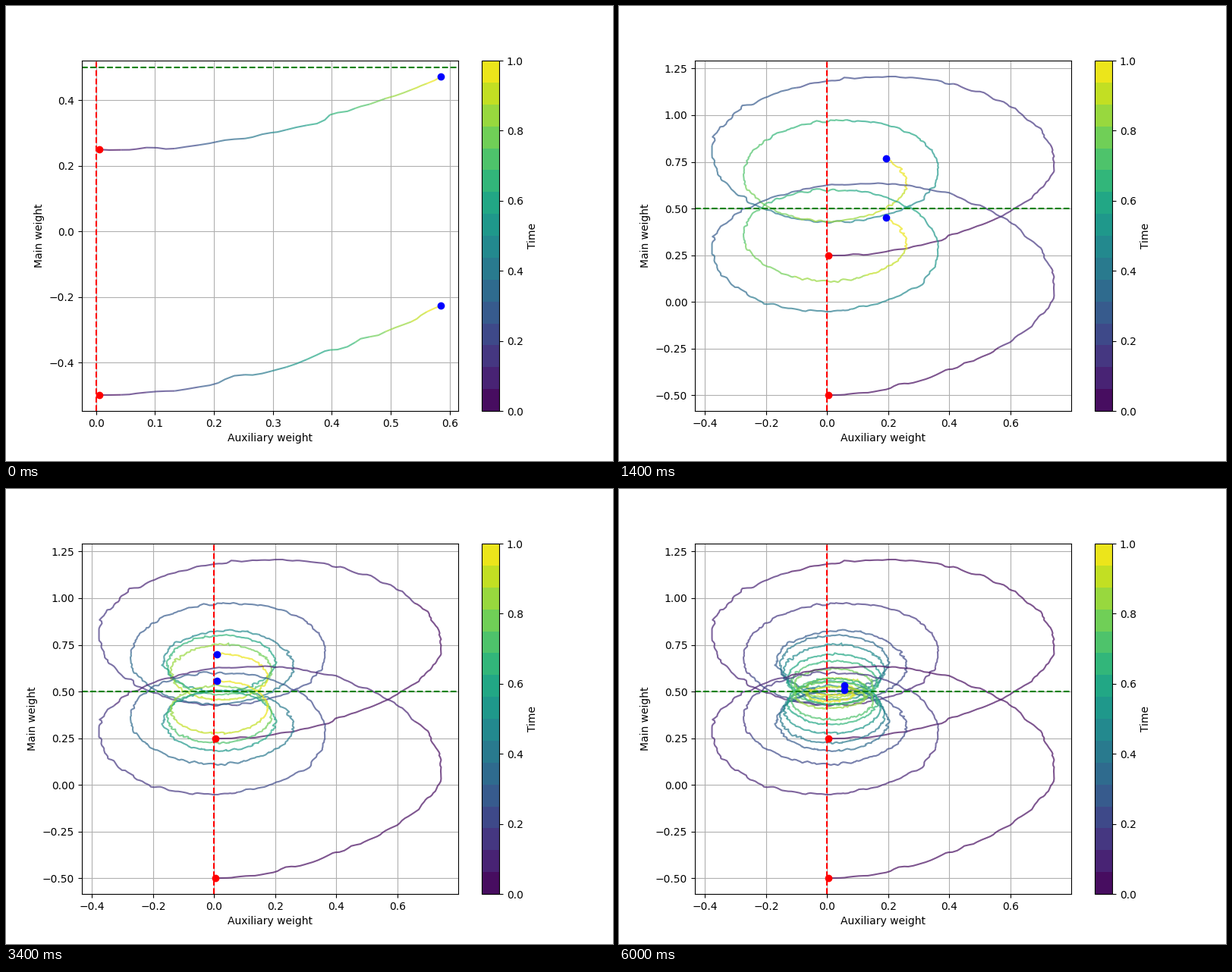
These frames come from a looping animation (800 px wide and 600 px high, 6180 ms). A matplotlib script:

```python
import numpy as np
import matplotlib.pyplot as plt
from matplotlib.animation import FuncAnimation
from matplotlib.cm import ScalarMappable
from matplotlib.collections import LineCollection
from matplotlib.colors import ListedColormap

STEPS = 61          # poses in one loop
TICK = 20           # ms per animation frame
HOLD = 5            # animation frames per pose
LOOP = 6180         # ms
PER_STEP = 40       # path points per pose
BANDS = 16          # steps of the colour scale
ALPHA = 0.7


def swing(phase, center, size):
    """Cosine sweeps between turning points center -/+ size(k), k = 0, 1, ..."""
    k = np.floor(phase)
    side = np.where(k % 2 == 0, -1, 1)
    start = center + side * size(k)
    stop = center - side * size(k + 1)
    return start + (stop - start) * (1 - np.cos(np.pi * (phase - k))) / 2


def x_size(k):
    return np.interp(k, [0, 1, 2, 3, 6, 16, 20],
                     [.753, .723, .397, .345, .185, .125, .045])


def y_size(k):
    return np.interp(k, [0, 1, 2, 3, 5, 14, 16, 20],
                     [.625, .421, .31, .2875, .165, .11, .06, .012])


def gap(phase):
    """Distance between the two paths."""
    return np.interp(phase, [0, 1, 2, 3.5, 6.4, 12, 20],
                     [.75, .572, .48, .32, .32, .105, .012])


def jitter(rng, t):
    """Short-range noise that vanishes at whole steps."""
    raw = np.convolve(rng.normal(size=t.size), [.4, .8, .4], mode="same")
    fade = .6 + .4 * np.exp(-t / 15)
    return .0045 * raw * fade * np.abs(np.sin(np.pi * t)) ** .3


def make_paths():
    rng = np.random.default_rng(4)
    t = np.arange(STEPS * PER_STEP + 1) / PER_STEP
    # quarter turns completed at time t
    q = np.interp(t, [0, 1, 11, 51, 61], [0, .576, 7, 32.1, 37.67])
    # y runs a little ahead of x at first
    lead = .128 * np.exp(-q) * np.sin(np.pi * q / 1.2)
    x = swing((q + 1) / 2, .02, x_size) + jitter(rng, t)
    x = np.clip(x, -.377, .743)
    mean = swing((q + lead) / 2, .5, y_size)
    paths = []
    for sign in (1, -1):
        y = mean + sign * gap(q / 2) / 2 + jitter(rng, t)
        paths.append(np.column_stack([x, np.clip(y, -.499, 1.207)]))
    return paths


def padded(values):
    lo, hi = values.min(), values.max()
    pad = .05 * (hi - lo)
    return lo - pad, hi + pad


paths = make_paths()
colors = plt.get_cmap("viridis")((np.arange(BANDS) + .5) / BANDS, alpha=ALPHA)

fig, ax = plt.subplots(figsize=(8, 6), dpi=100)
ax.set_xlabel("Auxiliary weight")
ax.set_ylabel("Main weight")
ax.grid(True)

trails, heads = [], []
for path in paths:
    trail = LineCollection([], colors=colors, linewidths=1.5)
    trails.append(ax.add_collection(trail, autolim=False))
ax.axvline(0, color="red", linestyle="--")
ax.axhline(.5, color="green", linestyle="--")
for path in paths:
    ax.plot(*path[0], "o", color="red", zorder=3)
    heads += ax.plot([], [], "o", color="blue", zorder=3)

fig.colorbar(ScalarMappable(cmap=ListedColormap(colors)), ax=ax, label="Time")


def update(frame):
    step = min(frame // HOLD, STEPS - 1)
    end = (step + 1) * PER_STEP
    cuts = np.linspace(0, end, BANDS + 1).round().astype(int)
    for path, trail, head in zip(paths, trails, heads):
        trail.set_segments([path[a:b + 1] for a, b in zip(cuts, cuts[1:])])
        head.set_data(path[end:end + 1, 0], path[end:end + 1, 1])
    seen = np.vstack([path[:end + 1] for path in paths])
    ax.set_xlim(padded(seen[:, 0]))
    ax.set_ylim(padded(seen[:, 1]))
    return trails + heads


anim = FuncAnimation(fig, update, frames=LOOP // TICK, interval=TICK,
                     repeat=True, repeat_delay=0, cache_frame_data=False)
plt.show()
```
